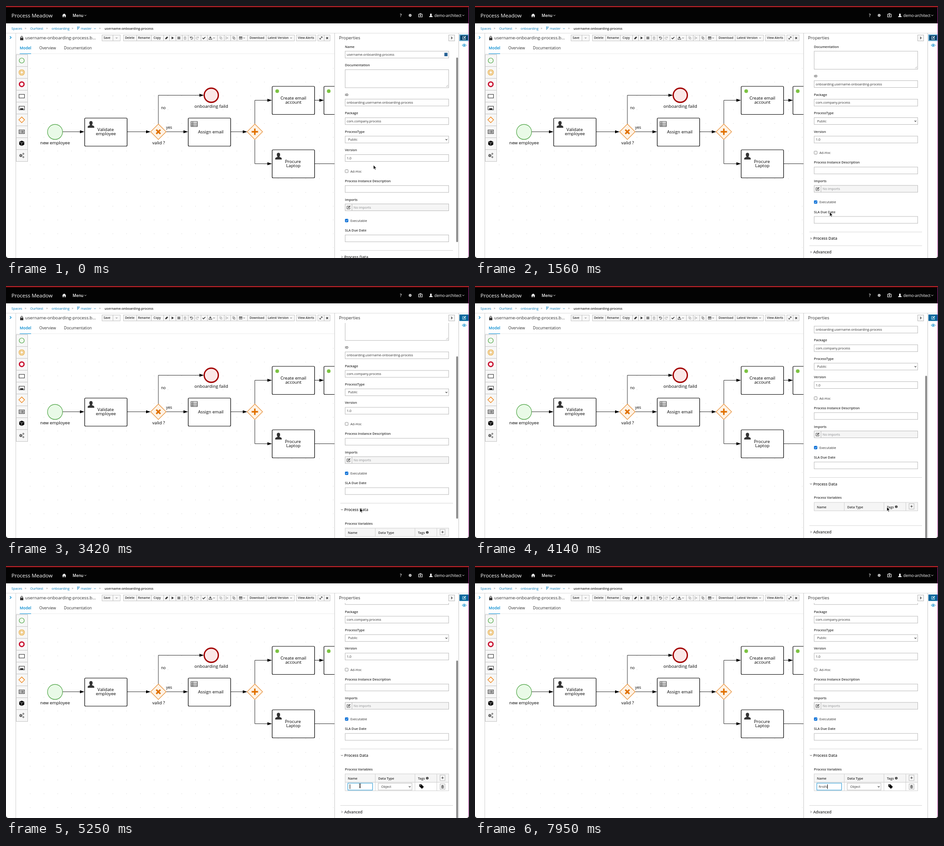
An HTML page that plays this animation: 1015x552 px, repeating every 8 s.

```html
<!DOCTYPE html>
<html lang="en">
<head>
<meta charset="utf-8">
<title>Process editor</title>
<style>
html, body { margin: 0; width: 100%; height: 100%; overflow: hidden; background: #fff; }
svg { display: block; width: 1015px; height: 552px; font-family: "Open Sans", sans-serif; }
text { white-space: pre; }
</style>
</head>
<body>
<svg id="stage" viewBox="0 0 1015 552"></svg>
<script>
const BLUE = '#0088ce', DARK = '#333', GREY = '#bbb', ORANGE = '#ec7a08';

// y is the middle of the capitals
const T = (x, y, s, size = 7.25, fill = DARK, more = '') =>
  `<text x="${x}" y="${y + size * .36}" font-size="${size}" fill="${fill}" ${more}>${s}</text>`;
const B = (x, y, s, size = 7.25, fill = DARK, more = '') => T(x, y, s, size, fill, 'font-weight="600" ' + more);
const M = (x, y, s, size = 9.64) => T(x, y, s, size, '#000', 'text-anchor="middle"');
const R = (x, y, w, h, fill = '#fff', stroke = 'none', more = '') =>
  `<rect x="${x}" y="${y}" width="${w}" height="${h}" fill="${fill}" stroke="${stroke}" ${more}/>`;
const P = (d, stroke = DARK, w = 1, fill = 'none', more = '') =>
  `<path d="${d}" stroke="${stroke}" stroke-width="${w}" fill="${fill}" ${more}/>`;
const C = (x, y, r, fill, stroke = 'none', w = 1) =>
  `<circle cx="${x}" cy="${y}" r="${r}" fill="${fill}" stroke="${stroke}" stroke-width="${w}"/>`;
const G = (id, body, more = '') => `<g id="${id}" ${more}>${body}</g>`;

// icons
const down = (x, y, c = DARK, k = 1) => P(`M${x - 2 * k} ${y - k}l${2 * k} ${2 * k} ${2 * k} ${-2 * k}`, c, .9);
const right = (x, y, c = DARK, k = 1) => P(`M${x - k} ${y - 2 * k}l${2 * k} ${2 * k} ${-2 * k} ${2 * k}`, c, k > 1 ? 1.3 : .9);
const trash = (x, y, c = DARK) => P(`M${x - 2.8} ${y - 2}h5.6M${x - 1} ${y - 3}h2`, c, .8) +
  P(`M${x - 2} ${y - 1.2}h4v4.4h-4zM${x} ${y - 1}v4`, c, .9);
const edit = (x, y, c) => P(`M${x + 1} ${y - 2.5}h-4.5v6h6.5v-3`, c, .9) + P(`M${x - 1} ${y + 1.3}l4.5-4.5`, c, 1.7);
const person = (x, y, k, c) => `<g transform="translate(${x} ${y}) scale(${k})">` +
  `<ellipse cy="-2.8" rx="3" ry="3.5" fill="${c}"/>` +
  P('M-6 6V4.5Q-6 2.4-2 1.5V-1H2V1.5Q6 2.4 6 4.5V6z', 'none', 0, c) + '</g>';
const pages = (x, y, c) => P(`M${x - 2.5} ${y - 3}h3v4h-3zM${x - .5} ${y - 1}h3v4h-3z`, c, .8);
const grid = (x, y, c) => P(`M${x - 3} ${y - 2}h6m-6 2h6m-6 2h6`, c, 1.4, 'none', 'stroke-dasharray="1.6 .6"');
const cog = (x, y, r, c) => C(x, y, r * .6, 'none', c, r * .5) +
  `<circle cx="${x}" cy="${y}" r="${r}" fill="none" stroke="${c}" stroke-width="${r * .4}" stroke-dasharray="${r * .39}"/>`;
const plus = (x, y) => P(`M${x - 2.5} ${y}h5M${x} ${y - 2.5}v5`, DARK, 1.1);

function header() {
  const crumbs = [[12, 'Spaces'], [53, 'OurNest'], [100, 'onboarding'], [164, 'master']];
  return R(0, 0, 1015, 3, '#7d0a0a') + R(0, 0, 1015, 1, '#c8404f') + R(0, 3, 1015, 35, '#030303') +
    T(12, 21, 'Process Meadow', 11.5, '#fff') +
    P('M123 20.5l4.5-4 4.5 4h-1.2v4h-2.3v-3h-2v3h-2.3v-4z', 'none', 0, '#fff') +
    B(146, 20.5, 'Menu', 8.6, '#fff') + down(174, 20.5, '#fff') +
    B(863.5, 20.5, '?', 8.6, '#fff') + cog(886, 20.5, 2.8, '#fff') +
    R(904.5, 18, 8, 6, 'none', '#fff') + P('M907 18v-1.5h3V18M906.5 21h4M908.5 19v4', '#fff', .9) +
    person(931.5, 20.5, .62, '#fff') + T(939, 20.5, 'demo-architect', 8.45, '#fff') + down(1002.5, 20.5, '#fff') +
    crumbs.map(c => T(c[0], 49, c[1], 7.25, '#0079b8')).join('') +
    [41, 88, 144, 204].map(x => T(x, 48.5, '»', 7.25, '#888')).join('') +
    P('M157 46v6M160 46v1.5q0 2-3 2.5', '#0079b8', .9) + C(157, 46, .9, '#0079b8') + C(160, 46, .9, '#0079b8') +
    down(195, 49.5, '#0079b8', .8) + B(216, 49, 'username-onboarding-process');
}

function toolbar() {
  const box = (x, x2) => R(x + .5, 63.5, x2 - x, 13, '#f7f7f7', GREY, 'stroke-width=".8"');
  const edges = [257, 286, 318, 345, 358, 372, 386, 399, 413, 427, 441, 463, 478, 492, 506, 529, 570, 632];
  const off = '#aaa', y = 70;
  const labels = [[214, 'Save'], [261, 'Delete'], [289.5, 'Rename'], [323.5, 'Copy'],
    [534, 'Download'], [574, 'Latest Version'], [640, 'View Alerts']];
  return P('M0 59.5H1014', '#ddd') + P('M21.5 59V552', '#d1d1d1') + right(10, 69, BLUE, 1.4) +
    R(31, 69.5, 7, 5.5, DARK) + P('M32.5 70v-2q2-4 4 0v2', DARK, 1.1) +
    T(42, 70, 'username-onboarding-process.b...', 9.66) +
    box(210, 234) + box(234, 250) + edges.slice(1).map((x, i) => box(edges[i], x)).join('') +
    box(636, 679) + box(683, 697) + box(697, 710) +
    labels.map(l => B(l[0], y, l[1], 6.65)).join('') +
    [242.5, 456, 522, 625].map(x => down(x, y, DARK, .8)).join('') +
    P('M349 72l3-4h3l-3 4z', DARK, 1, DARK) + P('M363 67l5 3-5 3z', 'none', 0, DARK) + grid(379, y, DARK) +
    trash(392.5, y, off) +
    P('M404 67v2.5h2.5M404.5 69a2.6 2.6 0 1 1 .3 3', DARK, 1) +
    P('M422 67v2.5h-2.5M421.5 69a2.6 2.6 0 1 0-.3 3', off, 1) +
    P('M431 70l2 2 4-4', DARK, 1.5) + P('M448 66.5v4m-2-2l2 2 2-2M445 71v2h6v-2', DARK, 1.1) +
    pages(471, y, off) + P('M482 67.5l5 4M482 72.5l5-4', off, 1) + C(482, 68, 1, off) + C(482, 72, 1, off) +
    pages(499.5, y, '#777') + R(511.5, 67.5, 6, 5, 'none', DARK, 'stroke-width=".8"') + P('M511.5 68.5h6M513 70.5h3', DARK, 1) +
    P('M688 72.5l5-5m-2.5 0h2.5v2.5M688 70v2.5h2.5', DARK, 1) + P('M702 68.2l4 4m0-4l-4 4', DARK, 1.4) +
    P('M22 104.5H720', '#ededed') + B(30, 92, 'Model', 8.45, BLUE) + R(30, 104, 25, 1, BLUE) +
    T(73, 92, 'Overview', 8.45) + T(127, 92, 'Documentation', 8.45);
}

function palette() {
  let s = '';
  for (let i = 0; i < 9; i++) s += R(22.5, 106.5 + 26 * i, 25, 26, '#f7f7f7', '#c4c4c4');
  const x = 34.5;
  return s + C(x, 119.5, 5.5, '#f0faee', '#4aa241', 1.2) +
    C(x, 145.5, 6, 'none', '#e8a020', 1.1) + C(x, 145.5, 3.5, 'none', '#e8a020', 1.1) +
    C(x, 171.3, 5, '#fff', '#c9102f', 2.8) +
    R(28.5, 193.5, 12, 8, 'none', DARK) + R(28.5, 219.5, 12, 8, 'none', DARK) + R(31, 224, 7, 3, DARK) +
    P('M34.5 243l6.3 6.3-6.3 6.3-6.3-6.3z', ORANGE, 1.2, '#fff6ec') +
    R(28.5, 271.5, 12, 8, 'none', DARK) + P('M30 273.8h2m1 0h6M30 275.6h2m1 0h6M30 277.4h2m1 0h6', DARK, 1) +
    P('M34.5 295l5.5 2.2v6.5l-5.5 2.8-5.5-2.8v-6.5z', 'none', 0, '#000') + P('M29.5 298l5 2 5-2M34.5 300v6', '#f7f7f7', .7) +
    cog(32.5, 327.5, 3, '#444') + cog(38, 323.7, 1.8, '#444') + cog(38, 331, 1.8, '#444');
}

function diagram() {
  const flow = (d, x, y) => P(d + (x ? `H${x - 5}` : ''), '#333', 1) +
    (x ? P(`M${x} ${y}l-10-3.2v6.4z`, 'none', 0, '#000') : '');
  const task = (x, y) => R(x + .5, y + .5, 93, 61.5, '#fff', '#000', 'rx="2" stroke-width="1.2"');
  const gate = x => P(`M${x} 258.5l17 17-17 17-17-17z`, '#e8913a', 1.2, '#fef3e6');
  let dots = '';
  for (let x = 52.5; x < 720; x += 30.2)
    for (let y = 136.5; y < 552; y += 30.2) dots += `M${x} ${y}h1`;
  return P(dots, '#c4c4c4', 1) +
    flow('M124 275.5', 172, 275.5) + flow('M266 275.5', 317, 275.5) + flow('M351 275.5', 399, 275.5) +
    flow('M493 275.5', 529, 275.5) + flow('M334 258.5V195.5', 434, 195.5) +
    flow('M545.5 258.5V206.5', 583, 206.5) + flow('M545.5 292.5V345.5', 583, 345.5) +
    flow('M677 206.5', 697, 206.5) + flow('M677 345.5H720') +
    C(107.5, 275.8, 16.5, '#e9fae7', '#4aa241', 1.2) + M(107.5, 299.5, 'new employee') +
    task(172, 245) + person(186.3, 259.5, 1.2, DARK) + M(218.5, 271, 'Validate') + M(219, 280, 'employee') +
    gate(334) + P('M329.5 271l9 9m0-9l-9 9', '#e07000', 3.3) + M(334.5, 299.5, 'valid ?') +
    M(345, 223, 'no', 8.4) + M(357.5, 265.5, 'yes', 8.4) +
    C(450, 195.5, 15.5, '#fbe8e8', '#a30000', 2.8) + M(450, 219.5, 'onboarding faild') +
    task(399, 245) + R(405.5, 253, 14, 11, '#fff', DARK) + P('M405.5 256.5h14m-14 2.7h14m-14 2.6h14M409.5 253v11', DARK, .9) +
    M(449, 276, 'Assign email') +
    gate(545.5) + P('M538.5 275.5h14M545.5 268.5v14', '#e07000', 3.3) +
    task(583, 175.5) + C(594.5, 186.5, 4, '#7cc242') + M(630, 201.5, 'Create email') + M(630, 210.5, 'account') +
    task(696.5, 175.5) + C(707.5, 186.5, 4, '#7cc242') +
    task(583, 314.5) + person(597.3, 329, 1.2, DARK) + M(629, 340.5, 'Procure') + M(630, 349.5, 'Laptop');
}

const select = (x, y, w, text, id) => R(x, y, w, 15, '#fff', GREY, `id="${id}"`) + T(x + 6.5, y + 7.5, text) +
  P(`M${x + w - 7} ${y + 6.5}l2 2.2 2-2.2`, DARK, 1.1);

function form() {
  const field = (y, label, value = '', id = '') => B(743, y, label) +
    R(743.5, y + 10, 227, 15, '#fff', GREY, id && `id="${id}"`) + T(747, y + 17.5, value);
  const check = (y, label, on) => R(743.5, y - 3.5, 6.5, 6.5, on ? '#0b6fd6' : '#fff', on ? '#0b6fd6' : '#777', 'rx="1" stroke-width=".8"') +
    (on ? P(`M744.8 ${y - .3}l1.5 1.6 2.4-3`, '#fff', 1) : '') + T(755, y, label);
  const button = (y, id, icon) => R(951.5, y - 6, 11, 12, '#f7f7f7', GREY, `id="${id}"`) + icon;
  return field(89, 'Name', 'username-onboarding-process') + R(961, 102.5, 7, 7.5, '#2a6496') +
    B(743, 129.5, 'Documentation') + R(743.5, 139.5, 227, 39.5, '#fff', GREY) + P('M965 177l4-4m-1.5 4l1.5-1.5', '#888', .7) +
    field(194, 'ID', 'onboarding.username-onboarding-process') + field(234.7, 'Package', 'com.company.process') +
    B(743, 275.2, 'ProcessType') + select(743.5, 285, 227, 'Public', 'kind') +
    field(315.5, 'Version', '1.0') + check(362, 'Ad-Hoc') +
    field(383.3, 'Process Instance Description', '', 'about') +
    B(743, 424, 'Imports') + R(743.5, 433.5, 227, 15, '#f5f5f5', GREY) + P('M758.5 433.5v15', GREY) + edit(751, 441, '#444') +
    T(762, 441, 'No imports', 7.25, '#8b8d8f') + check(470.2, 'Executable', true) + field(491.5, 'SLA Due Date') +
    P('M733 535.5H980', '#d6d6d6') + B(741.5, 549.6, 'Process Data', 8.45) +
    G('shut', right(736.5, 549.6)) + G('open', down(736.5, 549.6)) +
    G('vars', B(743, 579.6, 'Process Variables') + R(743.5, 590, 227, 18.5, '#f5f5f5', '#d1d1d1') +
      P('M809.5 590v18.5M896.5 590v18.5M944.5 590v18.5', '#d1d1d1') +
      B(749.5, 600, 'Name') + B(816, 600, 'Data Type') + B(903, 600, 'Tags') +
      C(923.5, 599.5, 2.8, DARK) + P('M923.5 599v2.2M923.5 597.5v.8', '#fff', .8) + button(598.7, 'add', plus(957, 598.7)) +
      G('row', R(743.5, 608.5, 227, 18.5, '#fff', '#d1d1d1') + P('M809.5 608.5V627M896.5 608.5V627M944.5 608.5V627', '#d1d1d1') +
        R(749.5, 610.5, 54, 15, '#fff', GREY, 'id="cell"') + T(753.5, 618, '', 7.25, DARK, 'id="typed"') +
        G('caret', R(0, 613, 1, 10, '#000')) + select(816, 610.5, 74, 'Object', 'type') +
        P('M906 613h4.5l5.5 5.5-4.2 4.2-5.8-5.5z', 'none', 0, '#000') + C(908, 615, .9, '#fff') +
        button(618, 'del', trash(957, 618)))) +
    G('adv', R(722, 564, 270, 200) + P('M733 565.5H980', '#d6d6d6') + right(736.5, 579.5) + B(741.5, 579.5, 'Advanced', 8.45));
}

function panel() {
  return R(720, 60, 295, 492) + P('M720.5 59V552M992.5 59V552', '#c8c8c8') +
    `<clipPath id="view"><rect x="722" y="81" width="270" height="471"/></clipPath>` +
    `<g clip-path="url(#view)">${G('form', form())}</g>` +
    T(730, 70, 'Properties', 9.66) + R(970.5, 63.5, 13, 13, '#f7f7f7', GREY) + right(977, 70, DARK, 1.1) +
    R(987, 81, 4, 100, '#8a8a8a', 'none', 'id="thumb" rx="2"') +
    R(994, 62.5, 20, 14, '#00659c') + G('ring', R(995.3, 63.5, 18, 12, '#003d66', '#7dc3e8', 'stroke-width="1.2"')) +
    edit(1004.5, 69.5, '#fff') + P('M1000 86q4.5-5.5 9 0-4.5 5.5-9 0z', BLUE, 1) + C(1004.5, 86, 1.6, BLUE);
}

const cursors =
  G('arrow', P('M0 0v9.2l2.1-2 1.5 3.4 1.5-.7-1.5-3.2h2.9z', '#fff', .7, '#000')) +
  G('hand', P('M-1 1q1-1.5 2 0v3.2l4.2 1v3.3L4 10.5H-.3L-3.4 6.6q0-1.4 1.2-.8L-1 6.8z', '#000', .9, '#fff')) +
  G('beam', P('M-2-4.5q2 0 2 1.2V3.3q0 1.2-2 1.2M2-4.5q-2 0-2 1.2V3.3q0 1.2 2 1.2M-1 1h2', '#000', .9));

const $ = id => document.getElementById(id);
$('stage').innerHTML = R(0, 0, 1015, 552) + header() + toolbar() + diagram() + palette() + panel() +
  R(1014, 3, 1, 549, '#a0288c') +
  P('M0 546q0 6 6 6H0zM1015 546q0 6-6 6h6z', 'none', 0, '#000') + G('mouse', cursors);

// value at time t along points [time, value...]
function track(points, t, ease = u => u) {
  const i = points.findIndex(p => p[0] > t);
  if (i < 0) return points[points.length - 1].slice(1);
  if (!i) return points[0].slice(1);
  const a = points[i - 1], b = points[i], u = ease((t - a[0]) / (b[0] - a[0]));
  return a.slice(1).map((v, k) => v + (b[k + 1] - v) * u);
}
const smooth = u => u * u * (3 - 2 * u);

const SCROLL = [[300, 0], [390, 12], [480, 32], [540, 38.5], [600, 40.5], [3210, 40.5], [3300, 45], [3420, 59.5],
  [3600, 96], [3720, 111], [3840, 116], [4830, 116], [4950, 122.5], [5040, 131], [5130, 134.7]];
const THUMB = [[1230, 1], [1380, 0], [3210, 0], [3240, 1], [5640, 1], [5790, 0]];
const MOUSE = [[900, 805.5, 348.5], [2010, 762, 509], [3210, 762, 509], [3410, 776, 486.5], [3720, 776, 486.5],
  [4380, 957, 483], [4620, 957, 483], [4940, 830.5, 499.5], [4980, 830.5, 499.5], [5220, 776, 481.5]];
const KEYS = [6450, 6690, 6810, 6930, 7050, 7890];

const show = (id, on) => $(id).setAttribute('visibility', on ? 'inherit' : 'hidden');
const within = (t, a, b) => t >= a && t < b;

function draw(t) {
  const [scroll] = track(SCROLL, t), [mx, my] = track(MOUSE, t, smooth);
  const hasRow = t >= 4560;
  const extra = 75.3 * track([[2820, 0], [3060, 1]], t, smooth)[0] + (hasRow ? 18.5 : 0);
  const opened = t >= 2820, focus = t >= 5240;

  $('form').setAttribute('transform', `translate(0 ${-scroll})`);
  $('adv').setAttribute('transform', `translate(0 ${extra})`);
  show('shut', !opened); show('open', opened); show('vars', opened);
  show('row', hasRow); show('ring', !opened);

  const zoom = 471 / (548.5 + extra), thumb = $('thumb');
  thumb.setAttribute('y', 81 + (scroll + 37) * zoom);
  thumb.setAttribute('height', 471 * zoom);
  thumb.setAttribute('opacity', track(THUMB, t)[0]);

  $('about').setAttribute('stroke', within(t, 540, 1250) ? '#7dc3e8' : GREY);
  $('type').setAttribute('stroke', within(t, 4880, 5080) ? '#7dc3e8' : GREY);
  $('add').setAttribute('stroke', within(t, 4560, 5240) ? BLUE : GREY);
  $('cell').setAttribute('stroke', focus ? '#3fa3d8' : GREY);
  $('cell').style.filter = focus ? 'drop-shadow(0 0 1.2px rgba(0, 136, 206, .4))' : '';

  const typed = $('typed');
  typed.textContent = 'firstN'.slice(0, KEYS.filter(k => k <= t).length);
  const wide = typed.textContent ? typed.getComputedTextLength() : 0;
  $('caret').setAttribute('transform', `translate(${753.5 + wide} 0)`);
  show('caret', within(t, 5240, 5740) || within(t, 6240, 7530) || t >= 7890);

  const beam = within(t, 5170, 6470), hand = within(t, 1920, 3240) || within(t, 4320, 4680);
  $('mouse').setAttribute('transform', `translate(${mx} ${my})`);
  show('beam', beam); show('hand', hand); show('arrow', !beam && !hand && t < 6470);
}

function tick() {
  draw(performance.now() % 8000);
  requestAnimationFrame(tick);
}
tick();
</script>
</body>
</html>
```
